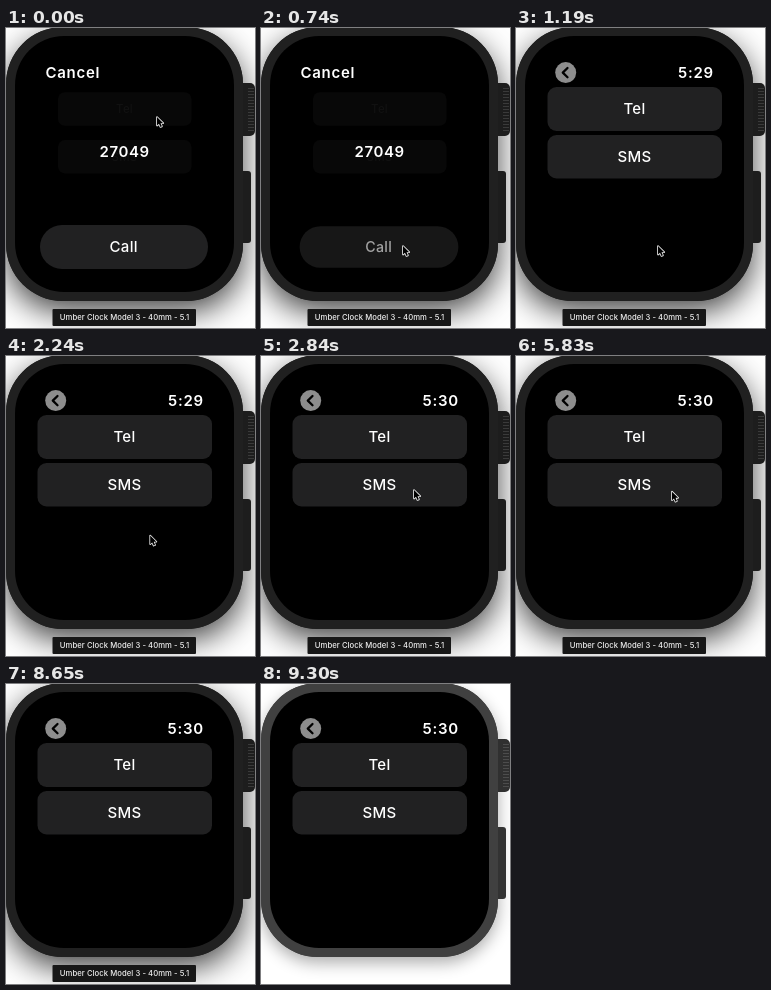
Write an HTML page with a canvas that moves like this. It is 249 by 300 pixels and loops after 9400 ms.

```html
<!DOCTYPE html>
<html lang="en">
<head>
<meta charset="utf-8">
<title>Watch call sheet</title>
<style>
  html, body { margin: 0; width: 100%; height: 100%; overflow: hidden; background: #fff; }
  canvas { display: block; width: 249px; height: 300px; }
</style>
</head>
<body>
<canvas id="stage"></canvas>
<script>
const LOOP = 9400, STEP = 150, W = 249, H = 300;
const canvas = document.getElementById('stage');
const ctx = canvas.getContext('2d');
const dpr = window.devicePixelRatio || 1;
canvas.width = W * dpr;
canvas.height = H * dpr;

// The screen refreshes every STEP ms: progress from 0 to 1 in n hard steps
function progress(t, start, n) {
  const done = Math.floor((t - start) / STEP) + 1;
  return Math.min(Math.max(done, 0), n) / n;
}

function cursorAt(t) {
  let x = 151, y = 89;
  const move = (start, n, toX, toY) => {
    const p = progress(t, start, n);
    x += (toX - x) * p;
    y += (toY - y) * p;
  };
  move(150, 2, 145, 191);
  move(590, 2, 142, 218);
  move(1640, 3, 142, 191);
  move(2240, 5, 153, 134);
  const k = 7 * progress(t, 5830, 7);
  if (k > 0) {
    x = 144 - 18 * Math.cos(1.4 + .9 * k);
    y = 129 + 20 * Math.sin(.9 * k - .56);
  }
  move(8050, 5, 204, 315);
  return [x, y];
}

function box(x, y, w, h, r, fill) {
  ctx.fillStyle = fill;
  ctx.beginPath();
  ctx.roundRect(x, y, w, h, r);
  ctx.fill();
}

function text(str, x, y, { size = 15, weight = 500, align = 'center', spacing = .3, color = '#fff' } = {}) {
  ctx.font = `${weight} ${size}px Inter, "Open Sans", sans-serif`;
  ctx.letterSpacing = spacing + 'px';
  ctx.textAlign = align;
  ctx.fillStyle = color;
  ctx.fillText(str, x, y);
}

function button(label, x, y, w, h, r, { scale, alpha, textAlpha }) {
  ctx.save();
  ctx.translate(x + w / 2, y + h / 2);
  ctx.scale(scale, scale);
  ctx.globalAlpha = alpha;
  box(-w / 2, -h / 2, w, h, r, '#212122');
  ctx.globalAlpha = textAlpha;
  text(label, -.3, 5.3);
  ctx.restore();
}

const pressed = p => ({ scale: 1 - .055 * p, alpha: 1 - .3 * p, textAlpha: 1 - .4 * p });

function watchCase(active) {
  const metal = active ? '#202020' : '#404040';
  const body = () => box(0, -1, 237, 274, 57, metal);
  ctx.save();
  ctx.shadowColor = active ? 'rgba(0,0,0,.72)' : 'rgba(0,0,0,.32)';
  ctx.shadowBlur = (active ? 31 : 16) * dpr;
  ctx.shadowOffsetY = (active ? 11 : 6) * dpr;
  body();
  ctx.restore();

  box(233, 143, 12, 72, 3, active ? '#1d1d1d' : '#333');
  box(231, 55, 18, 53, 5, active ? '#1d1d1d' : '#303030');
  ctx.fillStyle = active ? '#3a3a3a' : '#4c4c4c';
  for (let y = 60; y < 105; y += 3) ctx.fillRect(242, y, 6, 1);

  body();
  box(9, 8, 219, 256, 49, '#000');
}

function backButton() {
  ctx.fillStyle = '#8d8d8d';
  ctx.beginPath();
  ctx.arc(49.7, 44.6, 10.5, 0, 7);
  ctx.fill();
  ctx.strokeStyle = '#000';
  ctx.lineWidth = 2.3;
  ctx.lineCap = ctx.lineJoin = 'round';
  ctx.stroke(new Path2D('M51.5 40 L46.8 44.6 L51.5 49.2'));
}

function list(t, open) {
  const base = {
    scale: 1 - .235 * (1 - open) ** 1.75,
    alpha: .25 + .75 * open ** 2.5,
    textAlpha: .04 + .96 * open ** 2,
  };
  const push = pressed(progress(t, 7010, 3) - progress(t, 8050, 3));
  const smsLook = { ...base };
  for (const name in push) smsLook[name] *= push[name];
  button('Tel', 31.5, 59, 174.5, 44, 9, base);
  button('SMS', 31.5, 107, 174.5, 43.5, 9, smsLook);
  ctx.globalAlpha = open ** 6;
  text(t < 2540 ? '5:29' : '5:30', 198, 50, { weight: 600, align: 'right', spacing: .8 });
  ctx.globalAlpha = 1;
}

function sheet(t, open) {
  const dy = 56 * open ** 2;
  ctx.save();
  ctx.beginPath();
  ctx.rect(31, 30, 176, 213);
  ctx.clip();
  ctx.globalAlpha = 1 - .3 * open;
  text('Cancel', 39.5, 50, { weight: 600, align: 'left', spacing: .7 });
  ctx.globalAlpha = 1;
  text('27049', 118.7, 129.2 + dy, { weight: 600, spacing: .6 });
  button('Call', 34, 197 + dy, 168, 44, 22, pressed(progress(t, 590, 2)));
  ctx.restore();
}

const arrow = new Path2D('M0 0 V10 L2.3 7.9 L4 11.6 L5.7 10.9 L4.1 7.2 H7.2 Z');
function cursor(x, y) {
  ctx.save();
  ctx.translate(x, y);
  ctx.scale(.86, .86);
  ctx.lineJoin = 'round';
  ctx.lineWidth = 1.9;
  ctx.strokeStyle = '#eee';
  ctx.stroke(arrow);
  ctx.fillStyle = '#000';
  ctx.fill(arrow);
  ctx.restore();
}

function draw(t) {
  const active = t < 9300, open = progress(t, 890, 3);
  ctx.setTransform(dpr, 0, 0, dpr, 0, 0);
  ctx.fillStyle = '#fff';
  ctx.fillRect(0, 0, W, H);
  watchCase(active);
  list(t, open);
  if (open < 1) sheet(t, open);
  else backButton();
  if (active) {
    box(46.5, 281, 143.5, 17, 1, '#171717');
    text('Umber Clock Model 3 - 40mm - 5.1', 118.5, 292.4, { size: 7.7, spacing: .05, color: '#eee' });
  }
  cursor(...cursorAt(t));
}

function tick() {
  draw(performance.now() % LOOP);
  requestAnimationFrame(tick);
}
tick();
</script>
</body>
</html>
```
